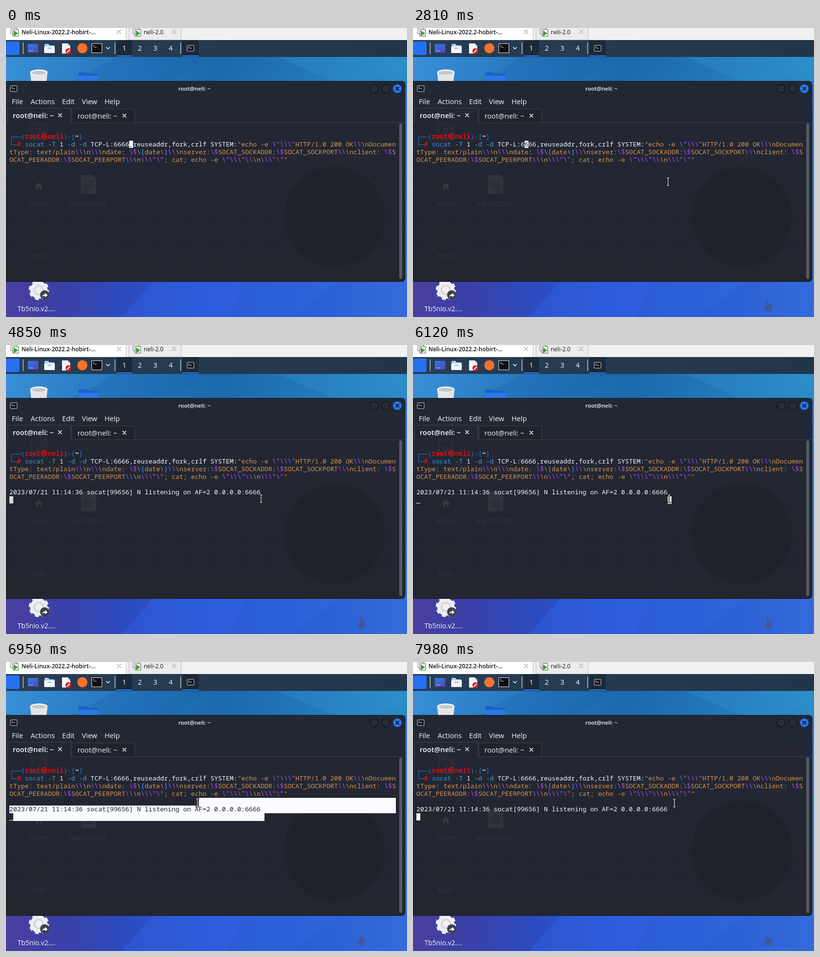
These frames come from a looping animation (830x600 px, 8 s). An HTML page:

```html
<!DOCTYPE html>
<html lang="en">
<head>
<meta charset="utf-8">
<title>Terminal session</title>
<style>
  html, body { margin: 0; width: 100%; height: 100%; overflow: hidden; background: #2a62d4; }
  svg { display: block; width: 830px; height: 600px; }
  text { font-family: "Open Sans", "Noto Sans", sans-serif; font-size: 14.67px; fill: #f4f6f8; white-space: pre; }
  .term text { font-family: "Noto Sans Mono", "DejaVu Sans Mono", monospace; font-size: 13.333px; font-variant-ligatures: none; }
  .tab { font-size: 12px; fill: #111; }
  .semi { font-weight: 600; }
  .mid { text-anchor: middle; }
  .ghost text { fill: #343741; font-size: 14px; text-anchor: middle; }
  .line { fill: none; stroke-linecap: round; stroke-linejoin: round; }
</style>
</head>
<body>
<svg viewBox="0 0 830 600">
  <defs>
    <linearGradient id="sky" x2="1" y2=".1">
      <stop offset="0" stop-color="#3a91d8"/><stop offset=".3" stop-color="#2677be"/>
      <stop offset=".55" stop-color="#1c68ad"/><stop offset=".8" stop-color="#2379bb"/>
      <stop offset="1" stop-color="#2b8bc8"/>
    </linearGradient>
    <linearGradient id="floor">
      <stop offset="0" stop-color="#493f9f"/><stop offset=".13" stop-color="#3b40a6"/>
      <stop offset=".3" stop-color="#2b4bc0"/><stop offset=".5" stop-color="#2a5ad6"/>
      <stop offset=".8" stop-color="#2f64da"/><stop offset="1" stop-color="#3a74e4"/>
    </linearGradient>
    <linearGradient id="bar"><stop offset="0" stop-color="#283d54"/><stop offset="1" stop-color="#233549"/></linearGradient>
    <linearGradient id="desk" x2="1" y2="1"><stop offset="0" stop-color="#2b7de0"/><stop offset="1" stop-color="#5a43b8"/></linearGradient>
    <linearGradient id="pane" x2="0" y2="1">
      <stop offset="0" stop-color="#212834"/><stop offset=".2" stop-color="#222733"/><stop offset="1" stop-color="#23252f"/>
    </linearGradient>
    <clipPath id="picked"><rect id="pickedBox" y="298" height="16"/></clipPath>
    <g id="console">
      <rect width="14" height="12" rx="1" fill="#14171d" stroke="#cfd4da"/>
      <path class="line" d="M3 3l2 1.500-2 1.500M6 6h3" stroke="#fff"/>
    </g>
    <g id="vm">
      <path d="M-3 -8h11v12h-12v-9z" fill="#fff" stroke="#666"/>
      <path d="M0 -5h12v14h-12z" fill="#f4f4f4" stroke="#555"/>
      <path d="M2 -3l9 6-9 6z" fill="#3d9b35"/>
    </g>
    <path id="x" class="line" d="M-4 -4l8 8M4 -4l-8 8"/>
  </defs>

  <!-- wallpaper -->
  <rect width="830" height="330" fill="url(#sky)"/>
  <path d="M230 59h190l-90 60H120z" fill="#1a62a8" opacity=".25"/>
  <path d="M560 59h270v30L700 120z" fill="#3492cc" opacity=".3"/>
  <rect y="330" width="830" height="270" fill="url(#floor)"/>
  <path d="M240 600l70-80h190l-40 80z" fill="#315fe0" opacity=".45"/>
  <path d="M590 600l110-80h130v80z" fill="#2b5acb" opacity=".4"/>
  <rect x="824" y="110" width="6" height="417" fill="#2f78d4"/>

  <!-- desktop icons -->
  <path d="M50 92l4 36h28l4-36z" fill="#e3e6e8"/>
  <ellipse cx="68" cy="92" rx="18" ry="6" fill="#f2f3f4"/>
  <ellipse cx="68" cy="93" rx="15" ry="4" fill="#c3c7ca"/>
  <path d="M150 94q0-2 2-2h13l4 3h20q2 0 2 2v16h-41z" fill="#1c5fc9"/>
  <path d="M150 99h41v14h-41z" fill="#2a78e4"/>
  <g transform="translate(68 544)">
    <circle r="14" fill="none" stroke="#eceef0" stroke-width="8"/>
    <circle r="18.500" fill="none" stroke="#eceef0" stroke-width="5" stroke-dasharray="8 6.530"/>
    <circle r="10" fill="#dadde2"/><circle r="7" fill="#f0f1f3"/>
    <circle cx="12" cy="10" r="9.500" fill="#3d4248"/>
    <path d="M7 14q1-5 6-5v-3l5 5-5 4v-3q-4 0-6 2z" fill="#fff"/>
  </g>
  <text class="mid" x="63" y="588" style="font-size:14px">Tb5nio.v2....</text>
  <path id="hand" d="M732 566q2-2 3 0v6l7 2q2 1 1 4l-2 10h-9l-5-8q-1-3 2-2l3 2z" fill="#3d5a96"/>

  <!-- host tabs -->
  <rect width="830" height="25" fill="#f1f1f1"/>
  <rect width="248" height="25" fill="#fff"/>
  <rect x="254.500" y="-1" width="108" height="26" fill="#ececec" stroke="#bdbdbd"/>
  <path d="M248.500 0v25" stroke="#bdbdbd"/>
  <use href="#vm" x="14" y="8"/><use href="#vm" x="267" y="8"/>
  <text class="tab semi" x="32" y="13">Neli-Linux-2022.2-hobirt-...</text>
  <text class="tab" x="285" y="13">neli-2.0</text>
  <g stroke="#aaa" stroke-width="1.200"><use href="#x" x="234" y="8"/><use href="#x" x="348" y="8"/></g>

  <!-- panel -->
  <rect y="25" width="830" height="35" fill="url(#bar)"/>
  <path d="M0 59.500h830" stroke="#1d3347"/>
  <rect y="28" width="28" height="28" rx="3" fill="#2670f0"/>
  <path d="M35.500 30v24M225.500 30v24M361.500 30v24" stroke="#b9c3cc" stroke-width="1.500"/>
  <rect x="45" y="33" width="22" height="18" rx="1" fill="url(#desk)"/>
  <path d="M48 47.500h8" stroke="#dfe8ff" stroke-dasharray="2 1"/>
  <path d="M80 33h8l2 3h10v15H80z" fill="#a9d0f5"/><rect x="79" y="38" width="22" height="14" rx="1" fill="#f1f5f9"/>
  <path d="M86 42h8" stroke="#8fb7df" stroke-width="2"/>
  <path d="M116 32h12l5 5v16h-17z" fill="#f5f5f5"/><path d="M128 32v5h5z" fill="#c8c8c8"/>
  <circle cx="129" cy="48" r="6" fill="#d3202c"/><path d="M126 51l6-6" stroke="#fff" stroke-width="2"/>
  <circle cx="158" cy="42" r="10.500" fill="#f5722d"/>
  <rect x="177.500" y="32.500" width="21" height="19" fill="#0d0f13" stroke="#e4e6e8"/>
  <path class="line" d="M181 36l2 1.500-2 1.500M184 40h3" stroke="#fff"/>
  <path class="line" d="M207.500 40l3.500 3.500 3.500-3.500" stroke="#eef1f4" stroke-width="1.500"/>
  <rect x="229" y="25" width="32" height="34" fill="#1c2938"/><rect x="365" y="25" width="34" height="34" fill="#1c2938"/>
  <path d="M229 58h32M365 58h34" stroke="#2f7cf0" stroke-width="2"/>
  <g class="mid"><text x="245" y="47">1</text><text x="277" y="47">2</text><text x="309" y="47">3</text><text x="341" y="47">4</text></g>
  <use href="#console" x="375" y="36"/>

  <!-- window -->
  <path d="M0 110.500h819q7 0 7 7v402q0 7-7 7H0z" fill="url(#pane)" stroke="#141821"/>
  <circle cx="680" cy="392" r="104" fill="#1f212b"/>
  <g class="ghost">
    <rect x="50" y="195" width="36" height="38" rx="3" fill="#282b35"/>
    <circle cx="67" cy="214" r="9" fill="none" stroke="#1f222b" stroke-width="2"/>
    <rect x="48" y="310" width="40" height="34" rx="2" fill="#23262f"/>
    <path d="M59 329l9-8 9 8h-3v7h-4v-5h-4v5h-4v-7z" fill="#343741"/>
    <path d="M155 305h24l8 8v32h-32z" fill="#30333c"/>
    <path d="M162 320h17M162 325h17M162 330h17M162 335h17" stroke="#252831" stroke-width="2"/>
    <rect x="48" y="420" width="40" height="32" rx="2" fill="#242630"/>
    <text x="68" y="370">Home</text><text x="169" y="370">top1000.txt</text><text x="67" y="479">Tools</text>
  </g>
  <use href="#console" x="9" y="120"/>
  <text class="semi mid" x="390" y="130" style="font-size:11.500px">root@neli: ~</text>
  <g fill="#282d39" stroke="#0f131a" stroke-width="1.500"><circle cx="762" cy="126" r="8.500"/><circle cx="786" cy="126" r="8.500"/></g>
  <circle cx="810" cy="126" r="9" fill="#2777f5"/>
  <path class="line" d="M807 123l6 6M813 123l-6 6" stroke="#101722" stroke-width="2"/>
  <text x="12" y="158">File</text><text x="51" y="158">Actions</text><text x="116" y="158">Edit</text>
  <text x="157" y="158">View</text><text x="204" y="158">Help</text>
  <path d="M136.500 196v-28h130v28" fill="#20232c" stroke="#3c404b"/>
  <path d="M0 196.500h3.500v-30h131v30H826" fill="none" stroke="#3f434e"/>
  <text class="semi" x="14" y="187">root@neli: ~</text><text x="148" y="188">root@neli: ~</text>
  <g stroke="#f4f6f8" stroke-width="2"><use href="#x" transform="translate(112 181) scale(.8)"/><use href="#x" transform="translate(245 182) scale(.8)"/></g>
  <rect x="814" y="198" width="6" height="323" rx="3" fill="#585b64"/>

  <g class="term">
    <path d="M31 226.500H11.500V242.500H23" fill="none" stroke="#2774d6"/>
    <g id="lines"></g>
    <g id="output">
      <text id="log" x="7" y="310"></text>
      <path id="pick" fill="#fafaff"/>
      <use href="#log" clip-path="url(#picked)" id="dark"/>
      <path id="under" d="M7 328.500h8" stroke="#fff"/>
    </g>
    <rect id="block" width="8" height="15" fill="#fff"/>
    <text id="under-block" y="246" style="fill:#20232c"></text>
  </g>
  <g id="beam" class="line">
    <path d="M-2.500 -8h5M0 -8V8M-2.500 8h5" stroke="#111" stroke-width="3.200"/>
    <path d="M-2.500 -8h5M0 -8V8M-2.500 8h5" stroke="#fff" stroke-width="1.200"/>
  </g>
</svg>
<script>
const $ = id => document.getElementById(id);
const NS = "http://www.w3.org/2000/svg";
const LOOP = 8000, CELL = 8, LEFT = 7;
const WHITE = "#f2f6fa", BLUE = "#2777e0", RED = "#e00b16", CMD = "#3f8edb", OPT = "#4a9fce",
      ORANGE = "#d8924f", PURPLE = "#8b3fc8";

function put(x, y, str, fill, bold) {
  const el = document.createElementNS(NS, "text");
  el.setAttribute("x", x);
  el.setAttribute("y", y);
  el.textContent = str;
  el.style.fill = fill;
  if (bold) el.style.fontWeight = 700;
  $("lines").append(el);
}

// Shell string: escapes are purple, brackets blue, the rest orange.
function quoted(x, y, str) {
  for (const [part] of str.matchAll(/\\[\\"$]|[()]|(?:\\(?![\\"$])|[^\\()])+/g)) {
    const escape = /^\\[\\"$]$/.test(part), bracket = /^[()]$/.test(part);
    put(x, y, part, escape ? PURPLE : bracket ? "#2f80f0" : ORANGE, escape || bracket);
    x += part.length * CELL;
  }
}

put(31, 230, "(", BLUE);
put(39, 230, "root", RED, true);
put(72, 230, "㉿", RED, true);
put(87, 230, "neli", RED, true);
put(119, 230, ")-[", BLUE);
put(143, 230, "~", WHITE, true);
put(151, 230, "]", BLUE);
put(23, 246, "#", RED, true);
put(39, 246, "socat", CMD);
put(87, 246, "-T", OPT);
put(111, 246, "1", WHITE);
put(127, 246, "-d", OPT);
put(151, 246, "-d", OPT);
put(175, 246, "TCP-L:6666,reuseaddr,fork,crlf SYSTEM:", WHITE);
quoted(479, 246, String.raw`"echo -e \"\\\"HTTP/1.0 200 OK\\\nDocumen`);
quoted(LEFT, 262, String.raw`tType: text/plain\\\n\\\ndate: \$\(date\)\\\nserver:\$SOCAT_SOCKADDR:\$SOCAT_SOCKPORT\\\nclient: \$S`);
quoted(LEFT, 278, String.raw`OCAT_PEERADDR:\$SOCAT_PEERPORT\\\n\\\"\"; cat; echo -e \"\\\"\\\n\\\"\""`);
$("log").textContent = "2023/07/21 11:14:36 socat[99656] N listening on AF=2 0.0.0.0:6666";

// The text colour is inherited, so the selected copy can be dark.
$("log").style.fill = "inherit";
$("output").style.fill = WHITE;
$("dark").style.fill = "#20232c";

const RUN = 4850, PRESS = 6120, RELEASE = 7770;
const caret = [[0, 255], [1800, 247], [2080, 239], [2200, 231], [2330, 223],
               [2810, 231], [3070, 239], [3210, 247], [3330, 255], [3460, 263]];
const path = [[260, 690, 505], [540, 550, 343], [740, 538, 330], [810, 528, 319],
              [6120, 530, 319], [6250, 526, 316], [6390, 511, 306], [6460, 440, 294],
              [6530, 415, 292], [6680, 402, 291], [6890, 397, 292], [6950, 396, 292],
              [7020, 402, 293], [7230, 470, 301], [7370, 530, 316], [7570, 548, 304],
              [7770, 546, 300], [7980, 541, 293]];
const holds = [540, 810, 7570];

// The pointer is sampled every 70 ms.
function pointer(t) {
  const i = path.findLastIndex(p => t >= p[0]);
  if (i < 0) return null;
  const [ta, xa, ya] = path[i], next = path[i + 1];
  if (!next || holds.includes(ta)) return [xa, ya];
  const k = Math.floor((t - ta) / 70) * 70 / (next[0] - ta);
  return [xa + (next[1] - xa) * k, ya + (next[2] - ya) * k];
}

const box = (x, y, right) => `M${x} ${y}H${right}v16H${x}z`;

function select(t) {
  let d = "", from = 807;
  if (t > PRESS && t < RELEASE) {
    const [px, py] = pointer(t - 70);
    const x = LEFT + Math.round((px - LEFT) / CELL) * CELL;
    let row = Math.floor((py - 282) / 16);
    if (t > 6950) row = Math.min(row, 1);
    d = box(row > 1 ? Math.min(x, 527) : 15, 314, 535);
    if (row < 2) {
      from = row < 1 ? LEFT : x;
      d += box(from, 298, 807);
    }
    if (row < 1) d += box(x, 282, 807);
  }
  $("pick").setAttribute("d", d);
  $("pickedBox").setAttribute("x", from);
  $("pickedBox").setAttribute("width", 807 - from);
  return d !== "";
}

const show = (id, on) => $(id).style.display = on ? "" : "none";

function draw(t) {
  const ran = t >= RUN, selecting = select(t);
  const x = ran ? LEFT : caret.findLast(c => t >= c[0])[1];
  show("output", ran);
  show("under", selecting);
  show("block", !selecting);
  $("block").setAttribute("x", x);
  $("block").setAttribute("y", ran ? 314 : 234);
  $("block").setAttribute("fill", ran && t < RELEASE ? "#d6d9de" : "#fff");
  $("under-block").setAttribute("x", x);
  $("under-block").textContent = ran ? "" : "6666,r"[(x - 223) / CELL];

  const p = pointer(t);
  show("hand", t >= 130);
  show("beam", p);
  if (p) $("beam").setAttribute("transform", `translate(${Math.round(p[0])} ${Math.round(p[1])})`);
}

const start = performance.now();
function tick() {
  draw((performance.now() - start) % LOOP);
  requestAnimationFrame(tick);
}
tick();
</script>
</body>
</html>
```
